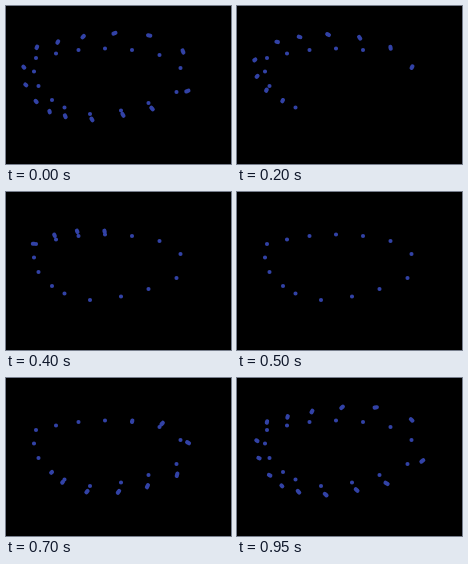
These frames come from a looping animation (225 by 158 pixels, 1 s). An HTML page:

```html
<!DOCTYPE html>
<html lang="en">
<head>
<meta charset="utf-8">
<title>Hopping dots</title>
<style>
  html, body { margin: 0; width: 100%; height: 100%; overflow: hidden; background: #000; }
  svg { display: block; width: 100%; height: 100%; }
  path { fill: none; stroke: #3242a6; stroke-width: 4.1; stroke-linecap: round; }
</style>
</head>
<body>
<svg viewBox="0 0 225 158"><path id="dots"/></svg>
<script>
const LOOP = 1000, STEP = 50, BLUR = 13;

// Resting places, clockwise from the top
const ring = [
  [99, 42.5], [126, 44], [153.5, 49], [174.5, 62], [170.5, 86],
  [142.5, 97], [115, 104.5], [84, 108], [58.5, 101.5], [46, 94],
  [32.5, 80], [28, 65.5], [30, 52], [50, 47.5], [72.5, 44]
];

const dots = document.getElementById('dots');
const wave = (i, peak) => Math.cos((i - peak) / ring.length * 2 * Math.PI);
const clamp = p => Math.min(1, Math.max(0, p));
const fix = n => n.toFixed(2);
const line = (a, b) => `M${fix(a[0])} ${fix(a[1])}L${fix(b[0] + 0.01)} ${fix(b[1])}`;

// The lower right hops first and fastest; the delay runs round the ring
const hops = ring.map((from, i) => ({
  from,
  to: ring[(i + 1) % ring.length],
  start: 677 - 120 * wave(i, 5),
  span: 604 - 95 * wave(i, 5),
  height: 15 + 2.5 * wave(i, 1.5)
}));

// Half ellipse bulging away from the ring
function arc({ from: [x, y], to, height }, progress) {
  const p = clamp(progress);
  const angle = Math.PI * (p - 0.04 * Math.sin(2 * Math.PI * p));
  const dx = to[0] - x, dy = to[1] - y;
  const along = (1 - Math.cos(angle)) / 2;
  const out = height * Math.sin(angle) / Math.hypot(dx, dy);
  return [x + dx * along + dy * out, y + dy * along - dx * out];
}

// Rest dots on the right and bottom blink off once their hops have landed
const resting = (i, t) => i < 2 || i > 7 || t < 150 || t >= 350;

function draw(t) {
  let d = '';
  hops.forEach((hop, i) => {
    if (resting(i, t)) d += line(hop.from, hop.from);
    const age = (t - hop.start + LOOP) % LOOP;
    if (age < hop.span) {
      d += line(arc(hop, (age - BLUR) / hop.span), arc(hop, (age + BLUR) / hop.span));
    }
  });
  dots.setAttribute('d', d);
}

const origin = performance.now();
function tick() {
  const t = (performance.now() - origin) % LOOP;
  draw(Math.floor(t / STEP) * STEP);
  requestAnimationFrame(tick);
}
draw(0);
requestAnimationFrame(tick);
</script>
</body>
</html>
```
